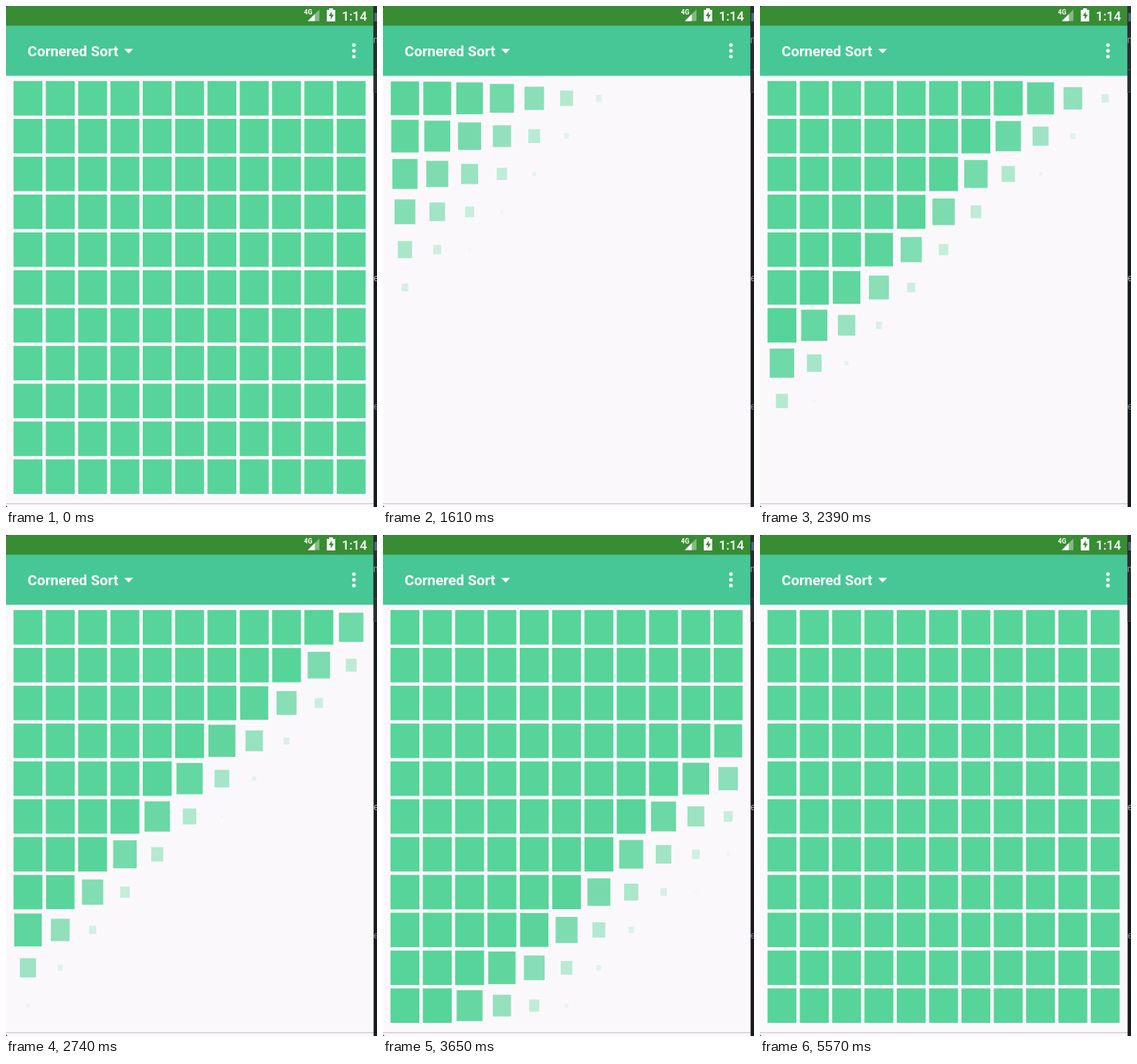
An HTML page that plays this animation: 480 by 648 pixels, repeating every 5.62 s.

```html
<!DOCTYPE html>
<html lang="en">
<head>
<meta charset="utf-8">
<title>Cornered Sort</title>
<style>
  html, body { margin: 0; width: 100%; height: 100%; overflow: hidden; background: #faf8fb; }
  svg { display: block; width: 480px; height: 648px; }
  text { font-family: Roboto, "Liberation Sans", sans-serif; fill: #fff; }
</style>
</head>
<body>
<svg viewBox="0 0 480 648" xmlns="http://www.w3.org/2000/svg">
  <rect width="480" height="648" fill="#faf8fb"/>
  <g id="tiles" fill="#57d499"></g>

  <!-- app bar -->
  <rect y="25" width="476" height="65.5" fill="#47c796"/>
  <rect y="90.3" width="476" height="1" fill="#dcefe6"/>
  <text x="28" y="65" font-size="18.6" font-weight="700">Cornered Sort</text>
  <path d="M153 55.5h11.4l-5.7 6z" fill="#fff"/>
  <g fill="#fff">
    <circle cx="450.2" cy="50.6" r="2.4"/>
    <circle cx="450.2" cy="58" r="2.4"/>
    <circle cx="450.2" cy="65.4" r="2.4"/>
  </g>

  <!-- status bar -->
  <rect width="476" height="25.5" fill="#388c34"/>
  <text x="385.5" y="11" font-size="8.6" font-weight="700">4G</text>
  <path d="M405.5 4.5V19.5H390.5z" fill="#86b984"/>
  <path d="M399.5 10.5V19.5H390.5z" fill="#fff"/>
  <path d="M418 3h5v2h3v15h-11V5h3z" fill="#fff"/>
  <path d="M421.5 7l-4 6h2.7v4.5l3.9-6.2h-2.6z" fill="#388c34"/>
  <text x="434.5" y="18.7" font-size="16.6" font-weight="500">1:14</text>

  <!-- bottom divider and the window behind -->
  <rect y="643" width="476" height="1.3" fill="#cfced1"/>
  <path d="M0 0h3q-3 0-3 3zM0 648h3q-3 0-3-3z" fill="#24262a"/>
  <rect x="475.6" width="4.4" height="648" fill="#17191d"/>
  <rect x="475.6" width="4.4" height="112" fill="#292c31"/>
  <rect x="475.6" y="82" width="4.4" height="1" fill="#44474b"/>
  <rect x="475.6" y="111" width="4.4" height="1" fill="#44474b"/>
  <rect x="476.5" y="9" width="3.5" height="11" fill="#4d6680"/>
  <text x="475" y="48" font-size="12" style="fill:#92959a">n</text>
  <text x="475.5" y="356" font-size="12" style="fill:#a3a6aa">e</text>
  <text x="475.5" y="522" font-size="12" style="fill:#66809b">e</text>
</svg>
<script>
const LOOP = 5620, HIDE_AT = 340, START = 846, STEP = 24.9, GROW = 840;
const COUNT = 11, PITCH_X = 41.82, PITCH_Y = 48.93, TILE_W = 37.4, TILE_H = 44.6;
const FIRST_X = 28.4, FIRST_Y = 119.4;

const layer = document.getElementById('tiles');
const tiles = Array.from({ length: COUNT * COUNT }, (_, i) => {
  const dx = (i % COUNT) * PITCH_X, dy = Math.floor(i / COUNT) * PITCH_Y;
  const node = document.createElementNS('http://www.w3.org/2000/svg', 'rect');
  layer.append(node);
  return { node, x: FIRST_X + dx, y: FIRST_Y + dy, distance: dx + dy };
}).sort((a, b) => a.distance - b.distance);

const clamp = v => Math.min(1, Math.max(0, v));
const ease = p => (1 - Math.cos(Math.PI * p)) / 2;

function draw(time) {
  tiles.forEach(({ node, x, y }, rank) => {
    const scale = time < HIDE_AT ? 1 : ease(clamp((time - START - rank * STEP) / GROW));
    const w = TILE_W * scale, h = TILE_H * scale;
    node.setAttribute('x', x - w / 2);
    node.setAttribute('y', y - h / 2);
    node.setAttribute('width', w);
    node.setAttribute('height', h);
    node.setAttribute('opacity', scale);
  });
}

const begin = performance.now();
function tick() {
  draw((performance.now() - begin) % LOOP);
  requestAnimationFrame(tick);
}
tick();
</script>
</body>
</html>
```
